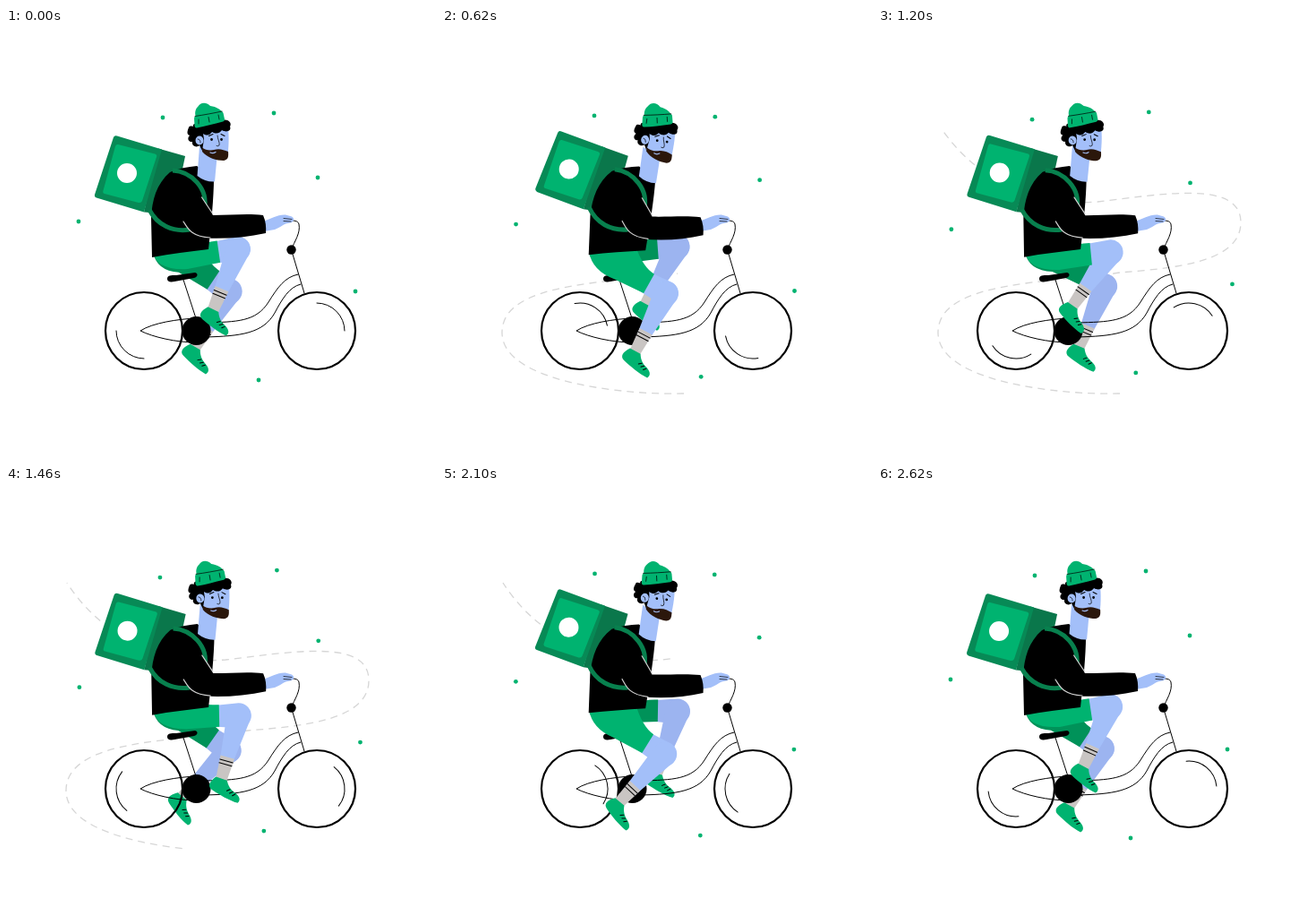
Recreate the animation shown at these times as an HTML page. Size 480 px wide and 480 px high, loop 2640 ms.

```html
<!DOCTYPE html>
<html lang="en">
<head>
<meta charset="utf-8">
<title>Courier on a bike</title>
<style>
  html, body { margin: 0; width: 100%; height: 100%; overflow: hidden; background: #fff; }
  svg { display: block; width: 100vw; height: 100vh; }
  .ln { fill: none; stroke: #000; stroke-width: 1; stroke-linecap: round; stroke-linejoin: round; }
  .thin { stroke-width: .7; }
  .wheel { fill: none; stroke: #000; stroke-width: 2.2; }
  .green { fill: #00b370; }
  .deep { fill: #078a56; }
  .skin { fill: #a3bff9; }
  .far .skin { fill: #9cb4f0; }
  .far .shorts { fill: #009259; }
  .strap { fill: none; stroke: #08804e; stroke-width: 5; }
  .crease { fill: none; stroke: #cfcfcf; stroke-width: 1.2; stroke-linecap: round; }
</style>
</head>
<body>
<svg viewBox="0 0 480 480" xmlns="http://www.w3.org/2000/svg">
  <defs>
    <g id="sock">
      <path fill="#c9c5c3" d="M-27,-8 L3,-6 L3,6 L-27,8 Z"/>
      <path class="ln" d="M-22.5,-7.5 V7.5 M-18.5,-7.3 V7.3"/>
    </g>
    <g id="shoe">
      <path class="green" d="M-7,-1 L6,-3 C10,2 14,4 19,5 C26,6 30,9 28,14 C18,16 5,15 -4,14 C-11,13 -11,7 -7,-1 Z"/>
      <path class="ln" d="M11,7.500 l2.500,-3 M15,8.500 l2.500,-3 M19,9.500 l2,-3"/>
    </g>
  </defs>

  <path id="wind" fill="none" stroke="#d6d6d6" stroke-width="1.3"
    d="M270,408 C215,410 67,398 67,340 C67,280 200,285 270,273 C330,268 405,262 405,217 C405,170 320,185 245,194 C160,200 100,158 68,108"/>
  <g id="dots" class="green"></g>

  <g id="farLeg" class="far"></g>

  <g id="bike">
    <path d="M180,280 C180,276 184,276 190,276 L211,273 C215,274 214,278 210,279 L188,283 C183,284 180,283 180,280 Z"/>
    <path class="ln" d="M198,281 L212,324"/>
    <path class="ln" d="M212,324 C192,325 164,329 150,338 C164,345 190,351 212,351"/>
    <path class="ln" d="M222,329 C258,328 279,328 293,306 C303,290 311,278 326,275"/>
    <path class="ln" d="M222,345 C262,344 287,341 300,318 C308,303 316,289 329,286"/>
    <circle class="wheel" cx="154" cy="338" r="43"/>
    <circle class="wheel" cx="347" cy="338" r="43"/>
    <path id="backArc" class="ln" d="M123,338 A31,31 0 0 0 154,369"/>
    <path id="frontArc" class="ln" d="M347,307 A31,31 0 0 1 378,338"/>
    <path class="ln" d="M333,296 L318.5,247.5 C322,238 329,229 327,219 C326,215 322,215 314,214.5"/>
    <circle cx="318.5" cy="247.5" r="5.2"/>
    <circle cx="212.5" cy="338" r="16"/>
  </g>

  <g id="nearLeg"></g>

  <g id="body">
    <g id="box">
      <path fill="#0a774b" d="M170,134.500 L200,143 L194,172 L172,207 L154,205.500 Z"/>
      <path class="deep" d="M124,120.5 Q121,119.5 120,122 L99,186 Q98.5,188.5 101,189.5 L154,205.5 L174,135.5 Z"/>
      <path class="green" d="M125,130 L166,140.5 Q169,141.5 168,144 L152,193 Q151,195.5 148,195 L110,185 Q107.5,184 108.5,181.5 L122,132 Q123,129.5 125,130 Z"/>
      <circle cx="135" cy="162" r="11" fill="#fff"/>
    </g>
    <path d="M163,256 L162,212 C163,192 168,174 183,161 C192,157 203,155 213,154 L232,168 C232,188 229,220 226,247 C204,250 184,252 163,256 Z"/>
    <path class="strap" d="M186,159 C206,160 227,179 221,203"/>
    <path class="strap" d="M160,203 C169,220 186,228 205,225"/>
    <path class="skin" d="M216,132 L213.5,165 Q222,172 233,171.5 L235.5,144 Z"/>
    <g id="head">
      <path class="skin" d="M213,112 L247,106 C249,116 249,128 247.5,142 L232,146 L219,137 Z"/>
      <path d="M204,111 C201,118 203,119 205,120 C201,124 205,128 208,127 C207,132 213,134 216,131 L219,137 L221,124 L220,118 C225,121 228,119 230,116 C235,119 239,117 241,114 C246,117 252,115 250,110 C253,105 246,101 242,103 L214,107 C210,106 208,108 209,110 C206,109 204,110 204,111 Z"/>
      <ellipse class="skin" cx="216" cy="125.5" rx="4.5" ry="5"/>
      <path class="ln thin" d="M214,124 Q217,124 217,128"/>
      <path fill="#2b170b" d="M219,133.500 C222,136 227,137 232,136 C238,134 243,136 248,138 C248.5,144 248,147 243,148 C235,148 225,145 219,138 Z"/>
      <path fill="none" stroke="#a3bff9" stroke-width="1.2" stroke-linecap="round" d="M228,139 Q231,140.5 234,138.5"/>
      <circle cx="229.5" cy="124.5" r="1.4"/>
      <circle cx="240.5" cy="124.5" r="1.4"/>
      <path class="ln thin" d="M236,120 C236,124 239,128 238,131 Q236.5,132.5 235,131.5"/>
      <path class="ln" d="M226.5,120.5 L231,118.5 M240,118.5 L244,120.5"/>
      <path class="green" d="M212,100 C210,94 212,90 214,88 C217,83 223,82 228,87 C235,88 240,91 242,95 Z"/>
      <path class="green" d="M212,98 C221,97 232,95 240,93 Q242,93 242.5,95 L244,102 Q244,104 242,104.5 C232,107 222,110 213,111.5 Q211,112 210.5,109.5 L210,101 Q210,98.5 212,98 Z"/>
      <path class="ln thin" d="M211,98.500 C221,97 232,95 241,93 M215,102 V107 M226,99.5 L227,105 M237,97 L238,102"/>
    </g>
  </g>

  <g id="hand">
    <path class="skin" d="M286,216 C296,213 303,208 312,208.5 L319,210.5 C323,213 321,217 317,217.5 C310,218 306,223 300,225 L288,227 Z"/>
    <path class="ln thin" d="M310,212.5 L319,213.5 M310,215.5 L318,216"/>
  </g>
  <path id="sleeve"/>
  <path id="crease" class="crease"/>
</svg>

<script>
const LOOP = 2640, TURN = LOOP / 2, STEP = 20;
const THIGH = 79, SHIN = 75, CRANK = 25.5, HEM = 57, LEAN = 3.7;
const TAU = Math.PI * 2, DEG = Math.PI / 180;
const $ = id => document.getElementById(id);

function add(parent, tag, attrs) {
  const el = document.createElementNS("http://www.w3.org/2000/svg", tag);
  for (const k in attrs) el.setAttribute(k, attrs[k]);
  return parent.appendChild(el);
}

const set = (el, name, v) => el.setAttribute(name, v);
const pt = p => p[0].toFixed(2) + "," + p[1].toFixed(2);
const clamp = u => Math.max(0, Math.min(1, u));
const ease = u => (1 - Math.cos(Math.PI * clamp(u))) / 2;

// point at (along, across) in a frame at o turned by a
function at(o, a, along, across) {
  const c = Math.cos(a), s = Math.sin(a);
  return [o[0] + along * c - across * s, o[1] + along * s + across * c];
}

function capsule(a, b, ra, rb) {
  const d = Math.atan2(b[1] - a[1], b[0] - a[0]);
  return `M${pt(at(a, d, 0, -ra))} L${pt(at(b, d, 0, -rb))} A${rb},${rb} 0 0 1 ${pt(at(b, d, 0, rb))}` +
    ` L${pt(at(a, d, 0, ra))} A${ra},${ra} 0 0 1 ${pt(at(a, d, 0, -ra))} Z`;
}

function makeLeg(id, hip, crank, shift) {
  const g = $(id);
  const thigh = add(g, "path", { class: "skin" });
  const shin = add(g, "path", { class: "skin" });
  const sock = add(g, "use", { href: "#sock" });
  const shoe = add(g, "use", { href: "#shoe" });
  const shorts = add(g, "path", { class: "green shorts" });

  return t => {
    const u = (t + shift) / TURN * TAU;
    const ang = u + (11 * Math.cos(u) - 66) * DEG;
    const ankle = at(crank, ang, CRANK, 0);
    const dx = ankle[0] - hip[0], dy = ankle[1] - hip[1], d = Math.hypot(dx, dy);
    const bend = Math.acos((THIGH ** 2 + d * d - SHIN ** 2) / (2 * THIGH * d));
    const a = Math.atan2(dy, dx) - bend;
    const knee = at(hip, a, THIGH, 0);
    const b = Math.atan2(ankle[1] - knee[1], ankle[0] - knee[0]);
    const foot = 40 - 15 * Math.cos(ang) - 4 * Math.sin(ang);
    const place = deg => `translate(${pt(ankle)}) rotate(${deg.toFixed(2)})`;

    set(thigh, "d", capsule(at(hip, a, 42, 0), knee, 11, 14));
    set(shin, "d", capsule(knee, at(ankle, b, -14, 0), 13.5, 6.5));
    set(sock, "transform", place(b / DEG));
    set(shoe, "transform", place(foot));
    set(shorts, "d", `M164,250 L216,243 Q${pt(at(hip, a, 42, -13))} ${pt(at(hip, a, HEM, -12.5))}` +
      ` L${pt(at(hip, a, HEM, 12))} L${pt(at(hip, a, 20, 14))} Q168,271 164,250 Z`);
  };
}

const legs = [
  makeLeg("farLeg", [184, 250], [216, 333], TURN / 2),
  makeLeg("nearLeg", [181, 258], [216, 337], 0)
];

// each dot swings along a curve: start, control, end
const dots = [
  [175, 100, 166, 94.7, 172.3, 102.5],
  [299, 95, 309.5, 104, 302, 93.5],
  [348, 167, 361.4, 170, 348, 173],
  [81, 216, 83.8, 218.5, 81.8, 225],
  [390, 294, 394.8, 296.5, 395.5, 285.5],
  [282, 393, 294.2, 389, 287.5, 384.8]
].map(p => ({ p, el: add($("dots"), "circle", { r: 2.4 }) }));

const wind = $("wind"), windLen = wind.getTotalLength();

function drawWind(t) {
  const end = ease((t - 40) / 1240) * windLen;
  const start = ease((t - 1243) / 1240) * windLen;
  const dash = [0, start];
  for (let x = start; x < end; x += 14) dash.push(Math.min(8, end - x), 6);
  dash.push(0, windLen * 2);
  set(wind, "stroke-dasharray", dash.map(v => v.toFixed(2)).join(" "));
  set(wind, "visibility", end - start > 0.5 ? "visible" : "hidden");
}

function drawArm(lean) {
  const pivot = [208, 266], a = lean * LEAN * DEG;
  const r = (x, y) => pt(at(pivot, a, x - pivot[0], y - pivot[1]));
  const c = (x, y) => pt([x + lean * 1.6, y + lean * 2.2]);
  set($("sleeve"), "d", `M${r(178, 168)} C${r(196, 158)} ${r(212, 172)} ${r(219, 190)} L${r(231, 209)}` +
    ` C${c(250, 209)} ${c(270, 207)} ${c(287, 209)} Q${c(291, 218)} ${c(290, 229)}` +
    ` C${c(268, 234)} ${c(245, 235.5)} ${r(221, 234.5)} C${r(208, 233)} ${r(202, 222)} ${r(196, 214)}` +
    ` C${r(180, 222)} ${r(168, 210)} ${r(166, 195)} Z`);
  set($("crease"), "d", `M${r(198, 216)} C${r(203, 224)} ${r(207, 233)} ${r(228, 234)}` +
    ` M${r(218.5, 189)} L${r(230.5, 207)}`);
}

function draw(t) {
  const spin = t / TURN * 360;
  set($("backArc"), "transform", `rotate(${spin} 154 338)`);
  set($("frontArc"), "transform", `rotate(${spin} 347 338)`);

  const lean = (1 - Math.cos((t - 20) / TURN * TAU)) / 2;
  set($("body"), "transform", `rotate(${lean * LEAN} 208 266)`);
  set($("head"), "transform", `rotate(${lean * 4} 240 150)`);
  drawArm(lean);
  legs.forEach(leg => leg(t));

  const s = (1 - Math.cos(t / LOOP * TAU)) / 2, q = 1 - s;
  for (const { p, el } of dots) {
    set(el, "cx", q * q * p[0] + 2 * q * s * p[2] + s * s * p[4]);
    set(el, "cy", q * q * p[1] + 2 * q * s * p[3] + s * s * p[5]);
  }
  drawWind(t);
}

const begin = performance.now();
function tick() {
  const t = (performance.now() - begin) % LOOP;
  draw(Math.floor(t / STEP) * STEP);
  requestAnimationFrame(tick);
}
tick();
</script>
</body>
</html>
```
